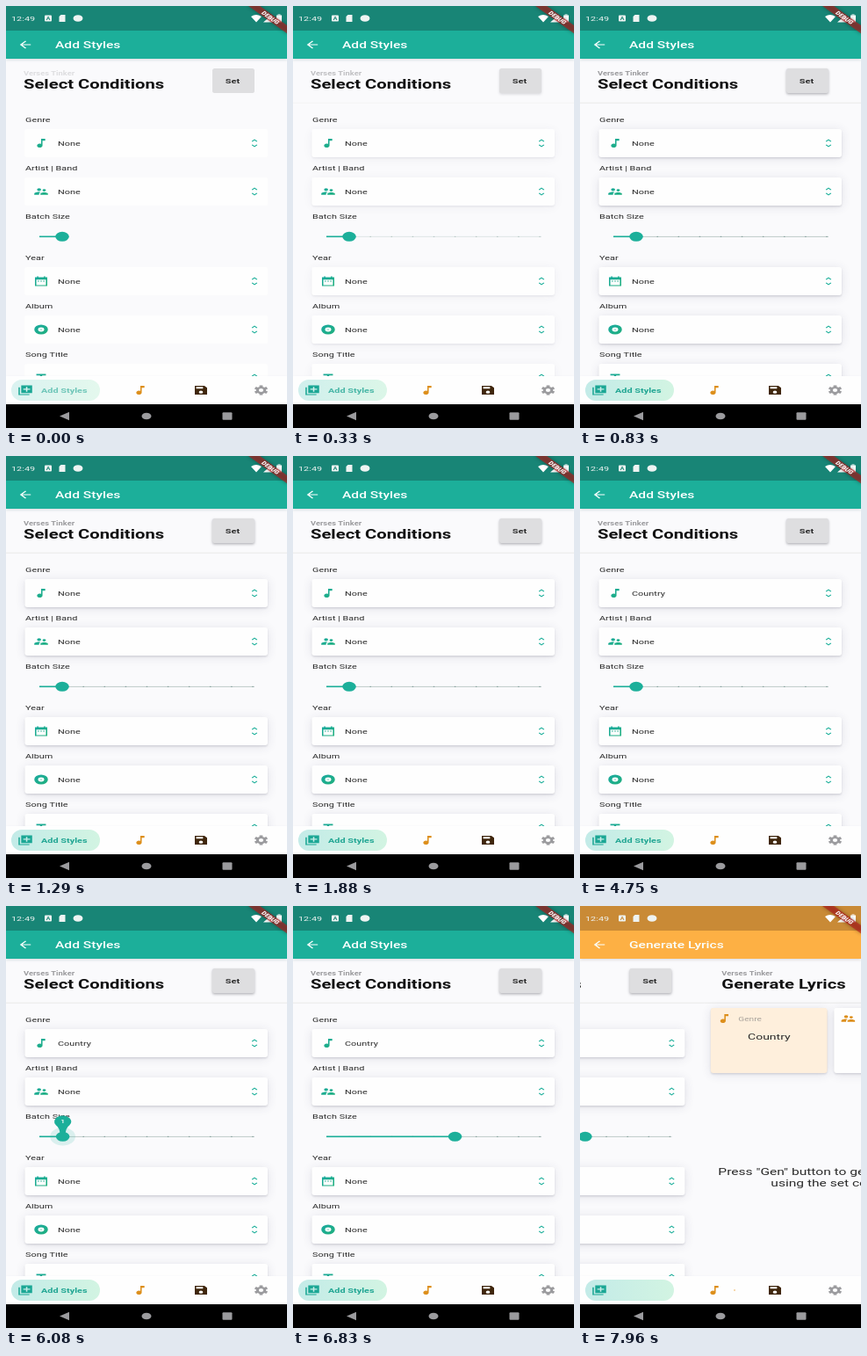
An HTML page with a canvas that plays this animation: 320 px wide and 480 px high, repeating every 8000 ms.

```html
<!DOCTYPE html>
<html lang="en">
<head>
<meta charset="utf-8">
<title>Add Styles</title>
<style>
html, body { margin: 0; width: 100%; height: 100%; overflow: hidden; background: #fafafc; }
canvas { display: block; width: 320px; height: 480px; }
</style>
</head>
<body>
<canvas id="stage" width="320" height="480"></canvas>
<script>
const canvas = document.getElementById('stage');
const ctx = canvas.getContext('2d');
const LOOP = 8000, FPS = 0.024;

// The 411 x 869 dp phone screen is squeezed into 320 x 480.
const SX = 320 / 411.4, SY = 480 / 868.6;

const TEAL = '#1caf9a', ORANGE = '#fdb044', PAGE = '#fafafc', CARD = '#fefefe';
const INK = '#2a2a2a', GREY = '#9b9b9e', LINE = '#e6e6e6';
const BRAND = 'Verses Tinker';
const GENRES = ['None', 'Pop', 'Rap', 'Country', 'Rock', 'Reggae'];
const FIELDS = [
  ['Genre', 140, 'note'], ['Artist | Band', 195, 'people'], ['Year', 297, 'date'],
  ['Album', 352, 'album'], ['Song Title', 407, 'title']
];

const ICONS = {
  note: 'M12 3v10.55a4 4 0 1 0 2 3.45V7h4V3z',
  people: 'M16.5 12a2.5 2.5 0 1 0 0-5 2.5 2.5 0 0 0 0 5zM9 11a3 3 0 1 0 0-6 3 3 0 0 0 0 6z' +
    'M16.5 14c-1.8 0-5.5.9-5.5 2.75V19h11v-2.25c0-1.8-3.7-2.75-5.5-2.75z' +
    'M9 13c-2.3 0-7 1.2-7 3.5V19h7v-2.25q0-2.2 2.4-3.5z',
  date: 'M19 4h-1V2h-2v2H8V2H6v2H3v18h18V4zM19 20H5V9h14zM7 11h2v2H7zM11 11h2v2h-2zM15 11h2v2h-2z',
  album: 'M2 12a10 10 0 1 0 20 0 10 10 0 1 0-20 0M7.5 12a4.5 4.5 0 1 0 9 0 4.5 4.5 0 1 0-9 0' +
    'M11 12a1 1 0 1 0 2 0 1 1 0 1 0-2 0',
  title: 'M5 4v3h5.5v12h3V7H19V4z',
  unfold: 'M12 3l4.6 4.6L15.2 9 12 5.8 8.8 9 7.4 7.6zM12 21l4.6-4.6L15.2 15 12 18.2 8.8 15l-1.4 1.4z',
  back: 'M20 11H7.8l5.6-5.6L12 4l-8 8 8 8 1.4-1.4L7.8 13H20z',
  add: 'M4 6H2v16h16v-2H4zM22 2H6v16h16zM19 11h-4v4h-2v-4H9V9h4V5h2v4h4z',
  save: 'M17 3H3v18h18V7zM12 19a3 3 0 1 1 0-6 3 3 0 0 1 0 6zM15 9H5V5h10z'
};
for (const k in ICONS) ICONS[k] = new Path2D(ICONS[k]);

const iconTint = ctx.createLinearGradient(2, 2, 22, 22);
iconTint.addColorStop(0, '#1aa9a0');
iconTint.addColorStop(1, '#20b07c');
const pillTint = ctx.createLinearGradient(6, 0, 107, 0);
pillTint.addColorStop(0, '#c3ebe8');
pillTint.addColorStop(1, '#d2f4e2');

const clamp = v => Math.max(0, Math.min(1, v));
const ramp = (t, a, b) => clamp((t - a) / (b - a));
const smooth = v => v * v * (3 - 2 * v);
const easeOut = v => 1 - (1 - v) ** 3;

// Runs draw with dp units around the pixel position x, y.
function at(x, y, draw) {
  ctx.save();
  ctx.translate(x, y);
  ctx.scale(SX, SY);
  draw();
  ctx.restore();
}

function text(s, x, y, size, color, weight = 400, align = 'left') {
  at(x, y, () => {
    ctx.font = `${weight} ${size}px Roboto, sans-serif`;
    ctx.textAlign = align;
    ctx.fillStyle = color;
    ctx.fillText(s, 0, 0);
  });
}

function icon(name, x, y, color, size = 24) {
  at(x, y, () => {
    ctx.scale(size / 24, size / 24);
    ctx.translate(-12, -12);
    ctx.fillStyle = color;
    ctx.fill(ICONS[name], 'evenodd');
  });
}

function rect(x, y, w, h, color) {
  ctx.fillStyle = color;
  ctx.fillRect(x, y, w, h);
}

function box(x, y, w, h, r, color, shadow, blur = 10) {
  ctx.save();
  if (shadow) {
    ctx.shadowColor = shadow;
    ctx.shadowBlur = blur;
    ctx.shadowOffsetY = 1.5;
  }
  ctx.fillStyle = color;
  ctx.beginPath();
  ctx.roundRect(x, y, w, h, r);
  ctx.fill();
  ctx.restore();
}

function oval(x, y, r, color) {
  at(x, y, () => {
    ctx.fillStyle = color;
    ctx.beginPath();
    ctx.arc(0, 0, r, 0, 7);
    ctx.fill();
  });
}

function withAlpha(a, draw) {
  ctx.save();
  ctx.globalAlpha *= a;
  draw();
  ctx.restore();
}

function panel(x, y, w, h, color, detail) {
  box(x, y, w, h, 3, color, `rgba(50,50,90,${0.12 * detail})`, 12);
  box(x, y, w, h, 3, color, `rgba(50,50,70,${0.14 * detail})`, 2);
}

function header(title, detail) {
  withAlpha(0.3 + 0.7 * detail, () => text(BRAND, 20, 78.7, 12, GREY, 700));
  text(title, 20, 94, 26, '#111', 700);
  withAlpha(detail, () => rect(0, 109.7, 320, 0.9, LINE));
}

function field([label, y, name], value, detail) {
  text(label, 22, y - 8, 14, INK);
  panel(21.5, y, 276.5, 32, CARD, detail);
  icon(name, 40, y + 16, iconTint);
  text(value, 59, y + 19.3, 14, INK);
  icon('unfold', 283, y + 16, TEAL, 22);
}

function slider(t, detail) {
  const y = 262.3;
  const step = 5 * smooth(ramp(t, 6060, 6620));
  const x = 64 + 24.1 * step;
  const pop = Math.min(ramp(t, 5960, 6120), 1 - ramp(t, 6660, 6830));
  text('Batch Size', 22, 242.3, 14, INK);
  withAlpha(detail, () => {
    rect(38, y - 0.4, 245, 0.9, '#b9c6c4');
    for (let k = 0; k <= 10; k++) oval(40 + 24.1 * k, y, 1.1, '#7f9c98');
  });
  rect(38, y - 0.8, x - 38, 1.6, TEAL);
  if (pop > 0) {
    oval(x, y, 24 * pop, 'rgba(30,174,155,.14)');
    at(x, y, () => {
      ctx.scale(pop, pop);
      ctx.fillStyle = TEAL;
      ctx.beginPath();
      ctx.arc(0, -40, 16, Math.PI * 0.8, Math.PI * 0.2);
      ctx.quadraticCurveTo(4, -22, 5, 0);
      ctx.lineTo(-5, 0);
      ctx.quadraticCurveTo(-4, -22, -13, -30.6);
      ctx.fill();
      ctx.font = '500 14px Roboto, sans-serif';
      ctx.textAlign = 'center';
      ctx.fillStyle = '#fff';
      ctx.fillText(1 + Math.round(step), 0, -35);
    });
  }
  oval(x, y, 10, TEAL);
}

function picker(t) {
  const scroll = 75 * smooth(ramp(t, 3330, 3833)) +
    8 * easeOut(ramp(t, 3833, 3960)) + 12.4 * easeOut(ramp(t, 4000, 4380));
  rect(0, 111, 320, 310, PAGE);
  rect(0, 199.7, 320, 0.9, LINE);
  rect(0, 231.5, 320, 0.9, LINE);
  const chosen = Math.round(scroll / 31.8);
  GENRES.forEach((g, i) =>
    text(g, 59, 219 + 31.8 * i - scroll, 14, i === chosen ? '#1c1c1c' : GREY));
}

function stylesPage(t, detail) {
  header('Select Conditions', detail);
  box(235, 71, 48, 28, 2.5, '#dedee0', `rgba(50,50,60,${0.35 * detail})`, 3);
  text('Set', 258, 87.8, 14, INK, 700, 'center');
  FIELDS.forEach((f, i) => field(f, i === 0 && t > 4000 ? 'Country' : 'None', detail));
  slider(t, detail);
  const open = ramp(t, 3170, 3330) * (1 - ramp(t, 4590, 4750));
  if (open > 0) withAlpha(open, () => picker(t));
}

function lyricsPage() {
  header('Generate Lyrics', 1);
  panel(7.5, 116, 132.5, 74, '#feefdc', 1);
  icon('note', 23, 128, '#dd8f1c');
  text('Genre', 39, 130.7, 13, '#aaa39c');
  text('Country', 74, 152, 18, INK, 400, 'center');
  panel(148, 116, 132.5, 74, CARD, 1);
  icon('people', 164, 128, '#dd8f1c');
  text('Press "Gen" button to generate lyrics', 16, 305.8, 20, INK);
  text('using the set conditions', 76, 319, 20, INK);
}

function statusBar(color) {
  rect(0, 0, 320, 28, color);
  const pale = '#eef3f2';
  text('12:49', 6, 17.2, 14, pale);
  box(44, 10.5, 8, 7, 1, pale);
  text('A', 48, 16.4, 9, color, 700, 'center');
  ctx.fillStyle = pale;
  ctx.beginPath();
  ctx.moveTo(62.5, 10);
  ctx.lineTo(67.5, 10);
  ctx.lineTo(67.5, 18);
  ctx.lineTo(60.5, 18);
  ctx.lineTo(60.5, 12);
  ctx.fill();
  oval(82, 14, 7, pale);
  // Wi-Fi, signal and battery
  ctx.fillStyle = '#fff';
  ctx.beginPath();
  ctx.moveTo(285, 18.5);
  ctx.lineTo(279, 12);
  ctx.quadraticCurveTo(285, 8, 291, 12);
  ctx.moveTo(293, 18.5);
  ctx.lineTo(303, 18.5);
  ctx.lineTo(303, 10);
  ctx.fill();
  rect(308, 10.5, 6, 8, '#fff');
  rect(309.5, 9.5, 3, 1, '#fff');
}

function debugBanner() {
  at(320, 0, () => {
    ctx.rotate(Math.PI / 4);
    ctx.fillStyle = 'rgba(183,28,28,.63)';
    ctx.shadowColor = 'rgba(0,0,0,.5)';
    ctx.shadowBlur = 4;
    ctx.fillRect(-40, 28, 80, 12);
    ctx.shadowColor = 'transparent';
    ctx.font = '900 10.2px Roboto, sans-serif';
    ctx.textAlign = 'center';
    ctx.fillStyle = '#fff';
    ctx.fillText('DEBUG', 0, 37.6);
  });
}

function gear(x, y, color) {
  at(x, y, () => {
    ctx.strokeStyle = ctx.fillStyle = color;
    ctx.lineWidth = 4;
    ctx.beginPath();
    ctx.arc(0, 0, 5.4, 0, 7);
    ctx.stroke();
    for (let i = 0; i < 6; i++) {
      ctx.rotate(Math.PI / 3);
      ctx.fillRect(-2.4, -10, 4.8, 4);
    }
  });
}

function bottomBars(slide, detail) {
  box(0, 421, 320, 34, 0, CARD, 'rgba(60,60,80,.12)', 4);
  withAlpha(0.6 + 0.4 * detail, () => {
    box(6, 425, 101, 24, 12, pillTint);
    if (!slide) text('Add Styles', 40, 440, 14, '#1fa592', 700);
  });
  icon('add', 22, 437, '#1ba795');
  icon('note', 153, 437, '#dd8f1c');
  if (slide) oval(176, 437, 1.4, '#f0bd74');
  icon('save', 222, 437, '#3f260c');
  gear(290.5, 437, GREY);
  rect(0, 453, 320, 27, '#000');
  ctx.fillStyle = GREY;
  ctx.beginPath();
  ctx.moveTo(61, 466.5);
  ctx.lineTo(72, 461.8);
  ctx.lineTo(72, 471.2);
  ctx.fill();
  oval(160, 466.5, 7, GREY);
  box(246.5, 462.3, 11, 8.4, 1, GREY);
}

// Softens the picture while the video is still sharpening.
function soften(amount) {
  ctx.save();
  ctx.filter = `blur(${amount}px)`;
  ctx.drawImage(canvas, 0, 0);
  ctx.restore();
}

function draw(ms) {
  // Motion advances on a 24 per second beat.
  const t = Math.floor((ms + 6) * FPS) / FPS;
  const detail = smooth(ramp(t, 0, 700));
  const slide = t < 7910 ? 0 : 178 + (t - 7958) * 1.9;

  rect(0, 0, 320, 480, PAGE);
  ctx.save();
  ctx.translate(-slide, 0);
  stylesPage(t, detail);
  if (slide) {
    ctx.translate(320, 0);
    lyricsPage();
  }
  ctx.restore();

  box(0, 28, 320, 32, 0, slide ? ORANGE : TEAL, 'rgba(60,60,80,.15)', 3);
  statusBar(slide ? '#c98a36' : '#188576');
  icon('back', 22, 44, '#fafffe');
  text(slide ? 'Generate Lyrics' : 'Add Styles', 56, 47.8, 20, '#fafffe', 500);
  debugBanner();
  bottomBars(slide, detail);
  if (detail < 0.95) soften(0.6 * (1 - detail));
}

let start;
function tick(now) {
  if (start === undefined) start = now;
  draw((now - start) % LOOP);
  requestAnimationFrame(tick);
}
draw(0);
requestAnimationFrame(tick);
</script>
</body>
</html>
```
